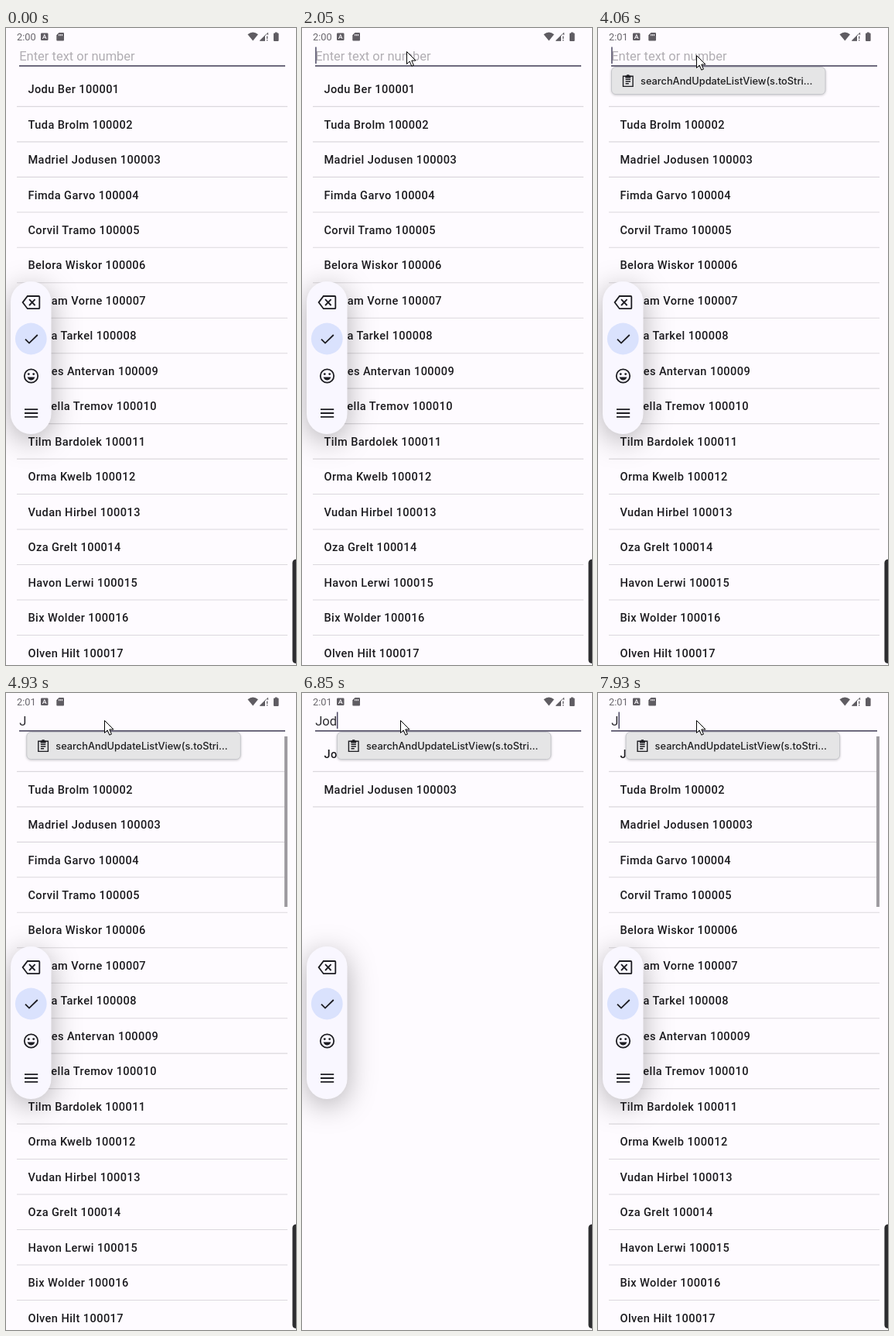
Animation of 375 by 822 pixels, one loop 8 s. Source, as an HTML page:

```html
<!DOCTYPE html>
<html lang="en">
<head>
<meta charset="utf-8">
<title>List search</title>
<style>
  html, body { margin: 0; width: 100%; height: 100%; overflow: hidden; background: #fefbff; }
  svg { display: block; width: 375px; height: 822px; }
  text { font-family: Roboto, sans-serif; white-space: pre; }
  .clock { font-size: 12.8px; fill: #69666c; }
  .entry { font-size: 16.6px; fill: #2d2b30; }
  .hint { font-size: 16.5px; fill: #b1aeb3; }
  .row text { font-size: 14.58px; font-weight: 500; letter-spacing: .42px; fill: #1c1b1f; }
  .row path { stroke: #dbd8dd; stroke-width: 1.1; }
  .clip text { font: 500 12.8px Inter, sans-serif; fill: #1f1f21; }
  .status { fill: #5f5c62; }
  .line { fill: none; stroke: #1d1d22; stroke-width: 1.8; }
  .pill { filter: drop-shadow(0 8px 18px rgba(0, 0, 0, .3)); }
  .box { filter: drop-shadow(0 1px 1.5px rgba(0, 0, 0, .2)); }
</style>
</head>
<body>
<svg viewBox="0 0 375 822">
  <rect width="375" height="822" fill="#fefbff"/>
  <g id="list"></g>
  <rect id="scrollbar" x="360" y="56" width="4" height="220" fill="#9f9ca1"/>

  <text id="clock" class="clock" x="14" y="15.6"></text>
  <g class="status">
    <rect x="45" y="6.5" width="9.5" height="9.5" rx="1.2"/>
    <path d="M47.4 14L49.75 8.5 52.1 14M48.3 12.2h2.9" fill="none" stroke="#fefbff"/>
    <path d="M68.5 6H74Q75 6 75 7V15.5Q75 16.5 74 16.5H66.3Q65.3 16.5 65.3 15.5V9.2z"/>
    <path d="M68.7 8v2.2M70.6 8v2.2M72.5 8v2.2" stroke="#fefbff"/>
    <path d="M312.5 8.3Q319.3 2.8 326 8.3L319.3 16.6z"/>
    <path d="M328.6 16.2L338.6 6.2V9M328.6 16.2H335" fill="none" stroke="#5f5c62"/>
    <path d="M328 16.6L335 9.6V16.6z"/>
    <path d="M337.7 10.5v3.4M337.7 15v1.6" stroke="#5f5c62" stroke-width="1.3"/>
    <path d="M348 5.5h2.6V6.6H351.6Q352.6 6.6 352.6 7.6V16Q352.6 17 351.6 17H347Q346 17 346 16V7.6Q346 6.6 347 6.6H348z"/>
  </g>

  <text id="hint" class="hint" x="17.2" y="41.7">Enter text or number</text>
  <text id="entry" class="entry" x="17.2" y="41.7"></text>
  <rect x="17" y="48" width="344" height="1.8" fill="#5e5a70"/>
  <rect id="caret" y="24.5" width="1.5" height="21.5" fill="#4b4763"/>

  <circle id="press" cx="127" cy="35.8" r="17" fill="#f2ea2a" opacity=".72"/>

  <g id="popup" class="clip">
    <rect id="popupBox" class="box" x=".5" y="50.5" width="276.5" height="35" rx="5.5" stroke="#c5c6cb"/>
    <g id="popupContent">
      <path class="line" style="stroke-width:1.4" d="M15.5 62.2h12.6V75.4H15.5zM18.6 66.3h6.4M18.6 69h6.4M18.6 71.7h4.2"/>
      <path d="M18.3 61.5h7v3h-7zM20.2 60.2h3.2v2h-3.2z" fill="#1d1d22"/>
      <text x="38" y="73.3">searchAndUpdateListView(s.toStri…</text>
    </g>
  </g>

  <rect class="pill" x="6" y="327" width="52.5" height="197" rx="26.2" fill="#f9f7ff"/>
  <circle cx="32.3" cy="401" r="20.4" fill="#dae2fd"/>
  <g class="line">
    <path d="M27.8 346H42.2Q43.3 346 43.3 347V361.2Q43.3 362.2 42.2 362.2H27.8L21.6 354.1z"/>
    <path d="M30 350.2l7.6 7.8M37.6 350.2l-7.6 7.8"/>
    <path d="M25 401.6l5 5L40.8 396"/>
    <circle cx="32.5" cy="449" r="8.7"/>
    <path d="M24 492.2h17.2M24 497h17.2M24 501.8h17.2"/>
  </g>
  <g fill="#1d1d22">
    <circle cx="29.3" cy="446.6" r="1.4"/>
    <circle cx="35.7" cy="446.6" r="1.4"/>
    <path d="M27.6 450.5h9.8Q36 454.5 32.5 454.5T27.6 450.5z"/>
  </g>

  <path d="M375.5 685.5H375Q370.4 686 370.4 690.5V815.5Q370.4 819.5 375 820H375.5z" fill="#2c2c2f"/>

  <path id="pointer" d="M.5.5V16.5L4.2 13 6.8 19.2 9.4 18.1 6.8 12H12z" fill="#fff" stroke="#000"/>
</svg>

<script>
const LOOP = 8000, PITCH = 45.47;
const $ = id => document.getElementById(id);

const names = [
  'Jodu Ber', 'Tuda Brolm', 'Madriel Jodusen', 'Fimda Garvo', 'Corvil Tramo', 'Belora Wiskor',
  'Tillbam Vorne', 'Elzira Tarkel', 'Wobes Antervan', 'Tisnella Tremov', 'Tilm Bardolek',
  'Orma Kwelb', 'Vudan Hirbel', 'Oza Grelt', 'Havon Lerwi', 'Bix Wolder', 'Olven Hilt'
];
const people = names.map((name, i) => `${name} ${100001 + i}`).concat('Jolbus Ravinel 100041');

// Timelines: [start in ms, value]
const typed = [[0, ''], [4460, 'J'], [5460, 'Jo'], [6850, 'Jod'], [7050, 'Jodu'],
  [7460, 'Jod'], [7660, 'Jo'], [7930, 'J']];
const popupSlot = [[0, 0], [4530, 1], [5460, 2], [6850, 3], [7050, 4], [7460, 3], [7660, 2]];
const popupScale = [[0, 0], [3310, .5], [3380, .7], [3450, 1]];
const caretOn = [[0, 0], [70, 1], [500, 0], [1060, 1], [1520, 0], [2050, 1], [2510, 0], [2970, 1],
  [3240, 0], [4060, 1], [4930, 0], [5460, 1], [5920, 0], [6450, 1]];
const pointerAt = [[0, null], [360, [180, 184]], [430, [173, 85]], [500, [169, 17]], [700, [158, 21]],
  [770, [148, 25]], [840, [139, 29]], [910, [135, 30]], [2970, [130, 33]], [3040, [127, 35]]];

const at = (timeline, t) => timeline.findLast(([start]) => start <= t)[1];
const show = (el, on) => el.setAttribute('visibility', on ? 'visible' : 'hidden');
const move = (el, x, y) => el.setAttribute('transform', `translate(${x} ${y})`);

let shownQuery = null;

function filterList(query) {
  if (query === shownQuery) return;
  shownQuery = query;
  const matches = query.length < 2 ? people : people.filter(p => p.includes(query));
  $('list').innerHTML = matches.slice(0, 17).map((person, i) =>
    `<g class="row" transform="translate(0 ${i * PITCH})">
      <text x="28.4" y="84.1">${person}</text><path d="M14 101.4H364"/></g>`).join('');
}

function drawPopup(t) {
  const scale = at(popupScale, t);
  show($('popup'), scale);
  $('popup').setAttribute('opacity', scale === .5 ? .5 : 1);
  $('popupBox').setAttribute('fill', scale < 1 ? '#fefbff' : '#e5e5e6');
  move($('popup'), 17 + 9.3 * at(popupSlot, t), 0);
  $('popupContent').setAttribute('opacity', scale);
  $('popupContent').setAttribute('transform',
    `translate(138.5 68.5) scale(${scale}) translate(-138.5 -68.5)`);
}

function draw(t) {
  const query = at(typed, t);
  const pressed = t >= 3240 && t < 3600;
  filterList(query);
  $('entry').textContent = query;
  $('clock').textContent = t < 3040 ? '2:00' : '2:01';
  show($('hint'), !query);
  $('hint').style.fill = pressed ? '#8d8a90' : '';
  show($('scrollbar'), t >= 4530 && query.length < 2);

  $('caret').setAttribute('x', 17.2 + 9.25 * query.length);
  show($('caret'), at(caretOn, t));
  drawPopup(t);

  show($('press'), pressed);
  const pos = at(pointerAt, t);
  show($('pointer'), pos);
  if (pos) move($('pointer'), ...pos);
}

const began = performance.now();
function tick() {
  draw((performance.now() - began) % LOOP);
  requestAnimationFrame(tick);
}
tick();
</script>
</body>
</html>
```
